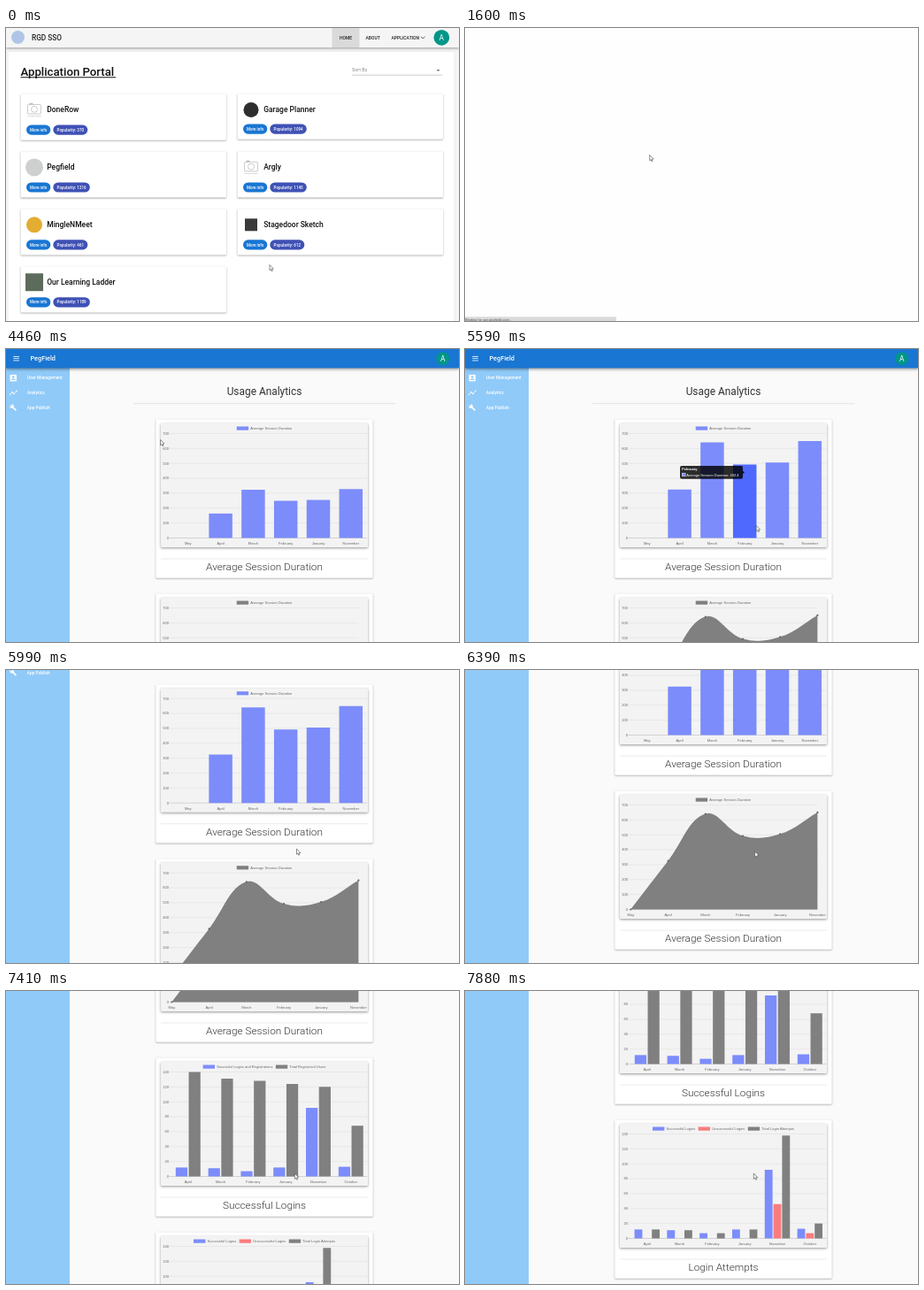
Write an HTML page with a canvas that moves like this. It is 512 px wide and 331 px high and loops after 8000 ms.

```html
<!DOCTYPE html>
<html lang="en">
<head>
<meta charset="utf-8">
<title>Application portal tour</title>
<style>
html, body { margin: 0; width: 100%; height: 100%; overflow: hidden; background: #fff; }
canvas { display: block; width: 512px; height: 331px; }
</style>
</head>
<body>
<canvas id="stage"></canvas>
<script>
const W = 512, H = 331, LOOP = 8000;
const BLUE = '#1976d2', TEAL = '#009688', INK = '#222', GREY = '#808080', BAR = '#7c8cfb', RED = '#fb7c7c';
const canvas = document.getElementById('stage');
const ctx = canvas.getContext('2d');
const ratio = Math.max(1, window.devicePixelRatio || 1);
canvas.width = W * ratio;
canvas.height = H * ratio;

// ---- drawing helpers ----
function text(str, x, y, size, color = INK, weight = 400, align = 'left', family = 'Roboto, sans-serif') {
  ctx.font = `${weight} ${size}px ${family}`;
  ctx.textAlign = align;
  ctx.fillStyle = color;
  ctx.fillText(str, x, y);
}
function rect(x, y, w, h, color, radius = 0) {
  ctx.fillStyle = color;
  ctx.beginPath();
  ctx.roundRect(x, y, w, h, radius);
  ctx.fill();
}
function raised(x, y, w, h, color, radius = 1, blur = 2, alpha = 0.32, drop = 0.8) {
  ctx.save();
  ctx.shadowColor = `rgba(0,0,0,${alpha})`;
  ctx.shadowBlur = blur * ratio;
  ctx.shadowOffsetY = drop * ratio;
  rect(x, y, w, h, color, radius);
  ctx.restore();
}
function circle(x, y, r, color) {
  ctx.fillStyle = color;
  ctx.beginPath();
  ctx.arc(x, y, r, 0, 7);
  ctx.fill();
}
function trace(points, close) {
  ctx.beginPath();
  points.forEach(([x, y]) => ctx.lineTo(x, y));
  if (close) ctx.closePath();
}
function poly(points, color) {
  trace(points, true);
  ctx.fillStyle = color;
  ctx.fill();
}
function line(points, color, width = 0.6) {
  trace(points);
  ctx.strokeStyle = color;
  ctx.lineWidth = width;
  ctx.stroke();
}
const caret = (x, y, color = '#757575') => poly([[x - 2, y - 1], [x + 2, y - 1], [x, y + 1]], color);

// Eased interpolation through rows of [time, ...values].
function track(rows, t) {
  const next = rows.findIndex(row => row[0] > t);
  if (next === 0) return rows[0].slice(1);
  if (next < 0) return rows[rows.length - 1].slice(1);
  const a = rows[next - 1], b = rows[next];
  const p = (t - a[0]) / (b[0] - a[0]);
  const e = p * p * (3 - 2 * p);
  return a.slice(1).map((v, i) => v + (b[i + 1] - v) * e);
}

// ---- application portal ----
const apps = [
  ['DoneRow', 370, 'camera'],
  ['Garage Planner', 1094, 'circle', '#2e2e2e', 8.5],
  ['Pegfield', 1216, 'circle', '#cdd0cf', 10],
  ['Argly', 1145, 'camera'],
  ['MingleNMeet', 461, 'circle', '#e3ad32', 9],
  ['Stagedoor Sketch', 612, 'square', '#3a3a3a', 7],
  ['Our Learning Ladder', 1189, 'square', '#5d6b5d', 10]
];

function appIcon(kind, x, y, color, r) {
  if (kind === 'circle') return circle(x, y, r, color);
  if (kind === 'square') return rect(x - r, y - r, 2 * r, 2 * r, color);
  ctx.strokeStyle = '#aaa';
  ctx.lineWidth = 0.6;
  ctx.beginPath();
  ctx.roundRect(x - 7.5, y - 6, 15, 10.5, 1);
  ctx.moveTo(x + 3.5, y - 0.7);
  ctx.arc(x, y - 0.7, 3.5, 0, 7);
  ctx.stroke();
  rect(x - 5.5, y - 7.7, 4, 1.5, '#bbb');
  text('no image available', x, y + 7.5, 1.9, '#999', 400, 'center');
}

function chip(x, y, w, label, color) {
  rect(x, y - 5.6, w, 11.2, color, 5.6);
  text(label, x + w / 2, y + 1.6, 4.5, '#fff', 500, 'center');
}

function portal(t) {
  rect(0, 0, W, H, '#f5f5f5');
  raised(2.5, 27, 504, 320, '#fff', 1, 2, 0.1, 0);
  raised(0, 0, W, 22, '#f5f5f5', 0, 3, 0.4, 1);
  circle(13.5, 10.5, 7.5, '#afc5e8');
  text('RGD SSO', 29, 13.8, 8.3, INK, 500);
  rect(368.5, 0, 31, 22, '#dadada');
  text('HOME', 384, 12.6, 5, INK, 500, 'center');
  text('ABOUT', 414.6, 12.6, 5, INK, 500, 'center');
  text('APPLICATION', 435.5, 12.6, 5, INK, 500);
  line([[469, 9.8], [471.2, 12], [473.4, 9.8]], '#333', 0.8);
  circle(492.3, 10.8, 8.9, TEAL);
  text('A', 492.3, 13.8, 8.4, '#fff', 400, 'center');

  text('Application Portal', 16.5, 54, 13.2, '#111', 500);
  rect(16.5, 55.3, 107.5, 1, '#111');
  text('Sort By', 391, 49.3, 5.4, '#8a8a8a');
  line([[391, 53.2], [493, 53.2]], '#999', 0.5);
  caret(488.5, 48);

  apps.forEach(([name, popularity, ...icon], i) => {
    const x = 16.5 + (i % 2) * 245, y = 74.5 + (i >> 1) * 64.9;
    const lift = i === 1 ? 1 : 0;
    const hovered = i === 2 && t > 400;
    raised(x, y, 232.5, 52.2 - lift, '#fff', 1, hovered ? 4 : 2, 0.36, hovered ? 1.6 : 0.8);
    appIcon(icon[0], x + 15.5, y + 18, icon[1], icon[2]);
    text(name, x + 29.7, y + 20.9 - lift / 2, 8.5, '#111', 500);
    if (i === 2 && t >= 710) rect(x + 29.7, y + 22.2, ctx.measureText(name).width, 0.7, '#111');
    const chipY = y + 40.6 - lift;
    chip(x + 6.5, chipY, 27.3, 'More info', BLUE);
    chip(x + 36.8, chipY, popularity < 1000 ? 39 : 41.5, 'Popularity: ' + popularity, '#3f51b5');
  });
}

// ---- management pages ----
let seed = 7;
const hex = n => Array.from({ length: n }, () => {
  seed = (seed * 16807) % 2147483647;
  return (seed >> 8 & 15).toString(16);
}).join('');

const users = [
  ['7eda2998-cade-42f2-', 'b8bc-3b917226bf21'],
  ['f4e8a115-a092-419c-', '9ad1-964721ecac02'],
  ['7ce69e3a-2f3d-4d59-', '9ede-b734d0d9da28'],
  ['0de1c87d-b091-49cd-', '9ffe-f8066a461ca7'],
  ['b829fa3e-4cd7-467b-', '9eb8-56d95e6ee6da']
].map(id => ({
  id,
  email: [
    `${hex(8)}-${hex(4)}-4${hex(3)}-${hex(4)}-`,
    `${hex(12)}@${hex(8)}-${hex(4)}-4${hex(3)}-${hex(4)}-`,
    `${hex(12)}.com`
  ]
}));

function appShell(t) {
  const [scroll] = track(scrollTrack, t);
  rect(0, 0, W, H, '#fafafa');
  ctx.save();
  ctx.translate(0, -scroll);
  if (t < 3950) userTable(t);
  else analytics(t);
  rect(0, 0, 72, H + scroll, '#90caf9');
  sidebar();
  raised(0, 0, W, 21.5, BLUE, 0, 3, 0.4, 1);
  [8, 10.3, 12.6].forEach(y => rect(8.3, y, 6.6, 0.8, '#fff'));
  text('PegField', 27.5, 13.3, 7.3, '#fff', 500);
  circle(493.7, 10.8, 7.4, TEAL);
  text('A', 493.7, 13.8, 8.4, '#fff', 400, 'center');
  ctx.restore();
  if (t < 4300) snackbar();
}

function sidebar() {
  rect(4.5, 29, 7.5, 7.5, '#fff', 1);
  circle(8.25, 31.6, 1.3, '#90caf9');
  rect(5.8, 33.8, 4.9, 1.3, '#90caf9', 0.6);
  const trend = [[4.6, 51.5], [7, 48.8], [9, 50.6], [12, 47.2]];
  line(trend, '#fff', 0.8);
  trend.forEach(([x, y]) => circle(x, y, 0.8, '#fff'));
  line([[7, 65], [11.4, 69.4]], '#fff', 1.7);
  circle(6.6, 64.7, 2.2, '#fff');
  poly([[4, 62.8], [5, 62], [6.8, 64], [6, 64.8]], '#90caf9');
  ['User Management', 'Analytics', 'App Publish'].forEach((label, i) =>
    text(label, 23.8, 34.2 + i * 16.8, 4.85, '#fff', 500));
}

function snackbar() {
  raised(205, -3, 101, 19.3, '#323232', 1, 3, 0.4);
  text('Hello, admin@pegfield.com', 213, 9.4, 5, '#fff', 500);
  circle(293.2, 6, 1.6, '#4caf50');
  rect(290, 8.3, 6.4, 2.3, '#4caf50', [1.6, 1.6, 0, 0]);
}

function userTable(t) {
  const loaded = t >= 2240;
  raised(72, 21.5, 440, loaded ? 164.5 : 60, '#fff', 0, 2, 0.5, 0.7);
  text('User Management', 80, 35.4, 7.35, INK);
  raised(465.7, 26.3, 36, 13, BLUE, 1, 2, 0.3);
  text('NEW USER', 483.7, 34.6, 4.9, '#fff', 500, 'center');

  const soft = '#777', dark = '#333', rule = '#e0e0e0';
  [['ID', 80], ['Manager', 263], ['Disabled', 302], ['Admin', 341.5], ['City', 376], ['State', 409.5],
    ['Country', 446], ['Actions', 483.5]].forEach(([label, x]) => text(label, x, 55.4, 4.2, soft, 500));
  text('Username', 144.5, 55.4, 4.2, dark, 500);
  line([[167, 55.5], [167, 52.2]], dark);
  line([[165.5, 53.7], [167, 52.2], [168.5, 53.7]], dark);
  line([[72, 62.3], [W, 62.3]], rule, 0.5);
  if (!loaded) return;

  users.forEach(({ id, email }, i) => {
    const y = 72.7 + i * 20.35;
    const cell = (lines, x, align) => lines.forEach((s, k) =>
      text(s, x, y + 1.5 + (k - (lines.length - 1) / 2) * 6.5, 4.4, dark, 400, align));
    cell(id, 80);
    cell(email, 144.5);
    cell(['false'], 319, 'right');
    cell(['false'], 355.5, 'right');
    cell(['Los', 'Angeles'], 376);
    cell(['California'], 409.5);
    cell(['United', 'States'], 446);
    line([[487.6, y + 1.6], [491, y - 1.8]], '#555', 1.3);
    rect(496.3, y - 1.2, 3, 3.4, '#555', 0.4);
    rect(495.9, y - 2.2, 3.8, 0.7, '#555');
    line([[72, y + 10.2], [W, y + 10.2]], rule, 0.5);
  });
  text('Rows per page:', 376, 177.4, 4.2, soft);
  text('5', 416.8, 177.4, 4.4, dark);
  line([[416, 181], [430, 181]], '#999', 0.5);
  caret(426, 176);
  text('1-5 of 520', 443.5, 177.4, 4.2, soft);
  line([[484, 173.8], [482, 176], [484, 178.2]], '#bbb', 0.8);
  line([[502.3, 173.8], [504.3, 176], [502.3, 178.2]], t < 2540 ? '#bbb' : '#444', 0.8);
}

// ---- analytics ----
const sessionMonths = ['May', 'April', 'March', 'February', 'January', 'November'];
const loginMonths = ['April', 'March', 'February', 'January', 'November', 'October'];
const sessions = [0, 325, 640, 492.4, 505, 650];
const logins = [12, 11, 7, 12, 92, 13];
const charts = [
  { title: 'Average Session Duration', months: sessionMonths, max: 700, step: 100,
    series: [['Average Session Duration', BAR, sessions]] },
  { title: 'Average Session Duration', months: sessionMonths, max: 700, step: 100, area: true,
    series: [['Average Session Duration', GREY, sessions]] },
  { title: 'Successful Logins', months: loginMonths, max: 140, step: 20,
    series: [['Sucessful Logins and Registrations', BAR, logins],
      ['Total Registered Users', GREY, [140, 131, 128, 124, 120, 68]]] },
  { title: 'Login Attempts', months: loginMonths, max: 140, step: 20,
    series: [['Successful Logins', BAR, logins],
      ['Unsuccessful Logins', RED, [0, 0, 0, 0, 46, 7]],
      ['Total Login Attempts', GREY, [12, 11, 7, 12, 138, 20]]] }
];
const LEFT = 187.4, SLOT = 36.8, PLOT = 118, ARIAL = 'Liberation Sans, Arial, sans-serif';
const label = (s, x, y, align, color = '#666', weight = 400) => text(s, x, y, 4.05, color, weight, align, ARIAL);

function analytics(t) {
  text('Usage Analytics', 292, 52.3, 11.9, '#333', 400, 'center');
  line([[144, 61.7], [440, 61.7]], '#d4d4d4', 0.6);
  if (t < 4200) return;
  const p = Math.min(1, Math.max(0, (t - 4300) / 1000));
  const growth = 1 - (1 - p) ** 4;
  const hovering = t > 5150 && t < 5760;
  charts.forEach((chart, i) => chartCard(chart, 79 + i * 197, growth, hovering && i === 0));
  if (hovering) tooltip();
}

function chartCard({ title, months, max, step, area, series }, top, growth, hovering) {
  const base = top + 134.5;
  const yOf = v => base - v / max * PLOT * growth;
  const right = area ? 398.4 : LEFT + SLOT * 6;
  const xOf = i => area ? LEFT + i * 42.2 : LEFT + (i + 0.5) * SLOT;

  raised(169.3, top + 0.5, 245.4, 179.3, '#fff', 1, 2, 0.34);
  raised(175, top + 5, 234, 140, '#f3f3f3', 1, 3, 0.42, 1);
  line([[175, top + 158], [409, top + 158]], '#ddd', 0.6);
  text(title, 292, top + 171, 11.8, '#333', 300, 'center');

  for (let v = 0; v <= max; v += step) {
    const y = base - v / max * PLOT;
    line([[184.5, y], [right, y]], `rgba(0,0,0,${v ? 0.1 : 0.28})`, 0.5);
    label(v, 184, y + 1.4, 'right');
  }
  legend(series, top + 10.5);
  if (area) areaSeries(series[0][2].map((v, i) => [xOf(i), yOf(v)]), base);
  else {
    const slot = SLOT * 0.8 / series.length;
    series.forEach(([, color, values], s) => values.forEach((v, i) => {
      const x = xOf(i) + (s - series.length / 2) * slot + slot * 0.05;
      rect(x, yOf(v), slot * 0.9, base - yOf(v), hovering && i === 3 ? '#4f69ff' : color);
    }));
  }
  months.forEach((m, i) => label(m, xOf(i), top + 142, 'center'));
}

function legend(series, y) {
  ctx.font = `400 4.05px ${ARIAL}`;
  const widths = series.map(([name]) => 15.6 + ctx.measureText(name).width);
  let x = 292 - (widths.reduce((a, b) => a + b) + 3.4 * (series.length - 1)) / 2;
  series.forEach(([name, color], i) => {
    rect(x, y - 2, 13.4, 4.2, color);
    label(name, x + 15.6, y + 1.5);
    x += widths[i] + 3.4;
  });
}

// Smooth curve with handles weighted by the distance to each neighbour.
function areaSeries(points, base) {
  const handles = points.map((p, i) => {
    const a = points[i - 1] || p, b = points[i + 1] || p;
    const da = Math.hypot(p[0] - a[0], p[1] - a[1]), db = Math.hypot(b[0] - p[0], b[1] - p[1]);
    const shift = (d, k) => p[k] + 0.4 * d / (da + db) * (b[k] - a[k]);
    return { before: [shift(-da, 0), shift(-da, 1)], after: [shift(db, 0), shift(db, 1)] };
  });
  const curve = new Path2D();
  curve.moveTo(...points[0]);
  for (let i = 1; i < points.length; i++)
    curve.bezierCurveTo(...handles[i - 1].after, ...handles[i].before, ...points[i]);
  const area = new Path2D(curve);
  area.lineTo(points[5][0], base);
  area.lineTo(points[0][0], base);
  ctx.fillStyle = GREY;
  ctx.fill(area);
  ctx.strokeStyle = 'rgba(0,0,0,.1)';
  ctx.lineWidth = 1;
  ctx.stroke(curve);
  points.forEach(([x, y]) => circle(x, y, 1.1, '#666'));
}

function tooltip() {
  const shade = 'rgba(0,0,0,.82)';
  rect(243, 132, 71, 14.8, shade, 2);
  poly([[314, 137.7], [316, 139.4], [314, 141.1]], shade);
  label('February', 245.2, 137.4, 'left', '#fff', 700);
  rect(245.2, 139.9, 4.2, 4.2, '#fff');
  rect(245.6, 140.3, 3.4, 3.4, BAR);
  label('Average Session Duration: 492.4', 250.2, 143.6, 'left', '#fff');
}

// ---- timeline ----
const scrollTrack = [[5640, 0], [6390, 140], [6480, 140], [6860, 232], [7010, 232], [7410, 398], [7560, 398], [7880, 525]];
const cursorTrack = [
  [60, 298, 267.5], [560, 70, 163], [710, 70, 163], [880, 70, 160], [1030, 70, 157],
  [1180, 70, 157], [1560, 208.7, 143.5], [1900, 208.7, 143.5], [2070, 222, 171],
  [2180, 222, 171], [2390, 216, 141], [2800, 216, 141], [3160, 60.3, 79.5], [3250, 60.3, 79.5],
  [3550, 35, 48], [4000, 35, 48], [4740, 240, 128], [5450, 329.2, 199.5], [5640, 329.2, 199.5],
  [6390, 327.7, 205], [6600, 327.7, 205], [7000, 326.3, 206]
];

function pointer(t) {
  const [x, y] = track(cursorTrack, t);
  const hand = t >= 1030 && t < 1260;
  const shape = hand
    ? [[0, 0], [1.4, 0], [1.4, 3], [5, 3.8], [5, 6.5], [4, 8.5], [0.4, 8.5], [-2, 5], [-1.2, 4.4], [0, 5.4]]
    : [[0, 0], [0, 6.3], [1.4, 5.1], [2.3, 7.2], [3.3, 6.8], [2.4, 4.7], [4.4, 4.6]];
  const placed = shape.map(([dx, dy]) => [x + dx, y + dy]);
  poly(placed, '#fff');
  line([...placed, placed[0]], '#444', 0.6);
}

function statusBar() {
  rect(0, 326.3, 171, 5, '#dadada', [0, 1, 0, 0]);
  text('Waiting for api.pegfield.com...', 0, 330.6, 4, '#555');
}

function frame() {
  const t = performance.now() % LOOP;
  ctx.setTransform(ratio, 0, 0, ratio, 0, 0);
  if (t < 1260) portal(t);
  else if (t < 1760) rect(0, 0, W, H, '#fefefe');
  else appShell(t);
  if (t >= 1260 && t < 2000) statusBar();
  pointer(t);
  requestAnimationFrame(frame);
}
frame();
</script>
</body>
</html>
```
